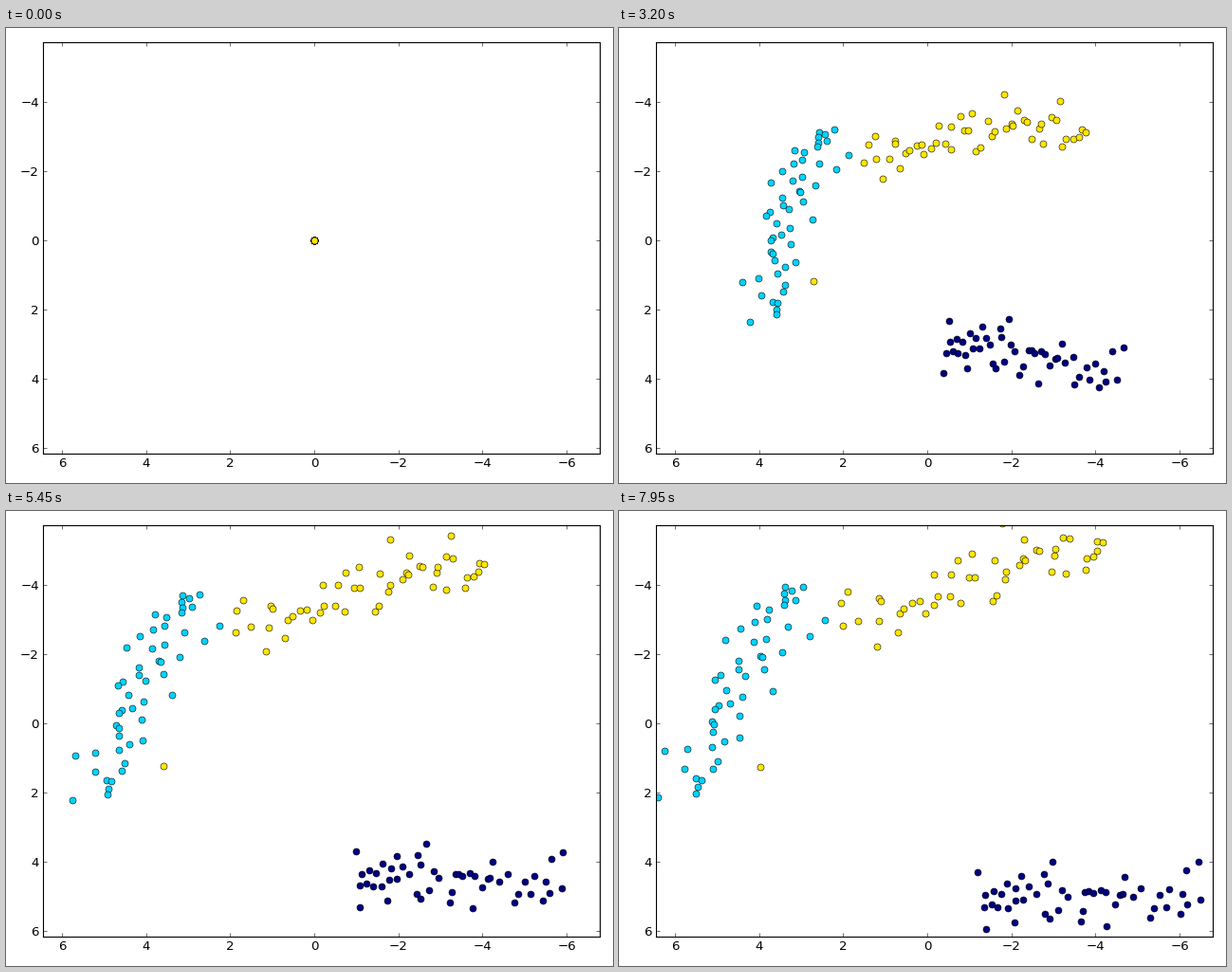
These frames come from a looping animation (640 by 480 pixels, 8 s). A matplotlib script:

```python
import numpy as np
import matplotlib.pyplot as plt
from matplotlib.animation import FuncAnimation
from matplotlib.ticker import MultipleLocator

WIDTH, HEIGHT, DPI = 640, 480, 80
FRAMES, INTERVAL = 160, 50
LEFT, RIGHT, TOP, BOTTOM = 39.4, 626.4, 14.6, 448.6  # plot area, stage pixels
CENTER = np.array([325.1, 224.1])                    # stage place of (0, 0)
UNIT = np.array([-44.33, 36.45])                     # pixels per data unit

NAVY, CYAN, YELLOW = "#000080", "#00d4ff", "#ffe600"

# Each cloud follows a curved spine. Its three poses (drawn to a line, opened
# up, pushed apart) give spine start, middle, end and the spread across it.
CLOUDS = [
    (NAVY, 50, [[(342, 274), (386, 293), (438, 315), (5, 4)],
                [(340, 328), (420, 343), (532, 366), (0, 32)],
                [(374, 402), (478, 408), (620, 402), (9, 35)]]),
    (CYAN, 50, [[(272, 150), (238, 200), (227, 284), (13, -4)],
                [(228, 104), (181, 192), (146, 310), (36, -1)],
                [(195, 76), (135, 175), (52, 303), (46, 5)]]),
    (YELLOW, 49, [[(279, 177), (366, 158), (420, 153), (-3, 4)],
                  [(254, 153), (377, 106), (495, 107), (-2, 25)],
                  [(234, 135), (385, 65), (511, 28), (8, 32)]]),
    (YELLOW, 1, [[(239, 248)] * 3 + [(0, 0)],
                 [(205, 266)] * 3 + [(0, 0)],
                 [(148, 269)] * 3 + [(0, 0)]]),
]

# Progress through the poses; 0 is the common starting point.
TIMES = [250, 1050, 1700, 1900, 2750, 3200, 3600, 4000, 4750, 6050, 7950]
PROGRESS = [0.04, 0.69, 1, 1.06, 1.42, 2, 2.28, 2.40, 2.51, 2.86, 3]

plt.rcParams["font.family"] = "DejaVu Sans"
rng = np.random.default_rng(7)


def place(along, across, pose):
    """Points on the parabola through the spine keys, offset by the spread."""
    start, middle, end, spread = (np.array(p, float) for p in pose)
    u = along[:, None]
    spine = (start * (1 - u) * (1 - 2 * u) + middle * 4 * u * (1 - u)
             + end * u * (2 * u - 1))
    return (spine + across[:, None] * spread + 0.5 - CENTER) / UNIT


def build_poses(count, poses):
    along = (np.arange(count) + rng.random(count)) / count
    across = np.clip(rng.normal(0, 0.55, count), -1.3, 1.3)
    placed = [place(along, across, pose) for pose in poses]
    return np.array([np.zeros((count, 2))] + placed)


fig = plt.figure(figsize=(WIDTH / DPI, HEIGHT / DPI), dpi=DPI, facecolor="white")
ax = fig.add_axes([LEFT / WIDTH, 1 - BOTTOM / HEIGHT,
                   (RIGHT - LEFT) / WIDTH, (BOTTOM - TOP) / HEIGHT])
ax.set_xlim((np.array([LEFT, RIGHT]) - CENTER[0]) / UNIT[0])
ax.set_ylim((np.array([BOTTOM, TOP]) - CENTER[1]) / UNIT[1])
for axis in (ax.xaxis, ax.yaxis):
    axis.set_major_locator(MultipleLocator(2))
ax.tick_params(direction="in", top=True, right=True, length=4, width=0.5,
               pad=4, labelsize=12)
for spine in ax.spines.values():
    spine.set_linewidth(1)

clouds = []
for color, count, keys in CLOUDS:
    poses = build_poses(count, keys)
    dots = ax.scatter(*poses[0].T, s=40, c=color, edgecolors="black",
                      linewidths=0.5)
    clouds.append((dots, poses))


def update(frame):
    progress = np.interp(frame * INTERVAL, TIMES, PROGRESS, left=0)
    k = min(int(progress), 2)
    blend = progress - k
    for dots, poses in clouds:
        dots.set_offsets((1 - blend) * poses[k] + blend * poses[k + 1])
    return [dots for dots, _ in clouds]


anim = FuncAnimation(fig, update, frames=FRAMES, interval=INTERVAL,
                     init_func=lambda: update(0), repeat=True, repeat_delay=0)
plt.show()
```
